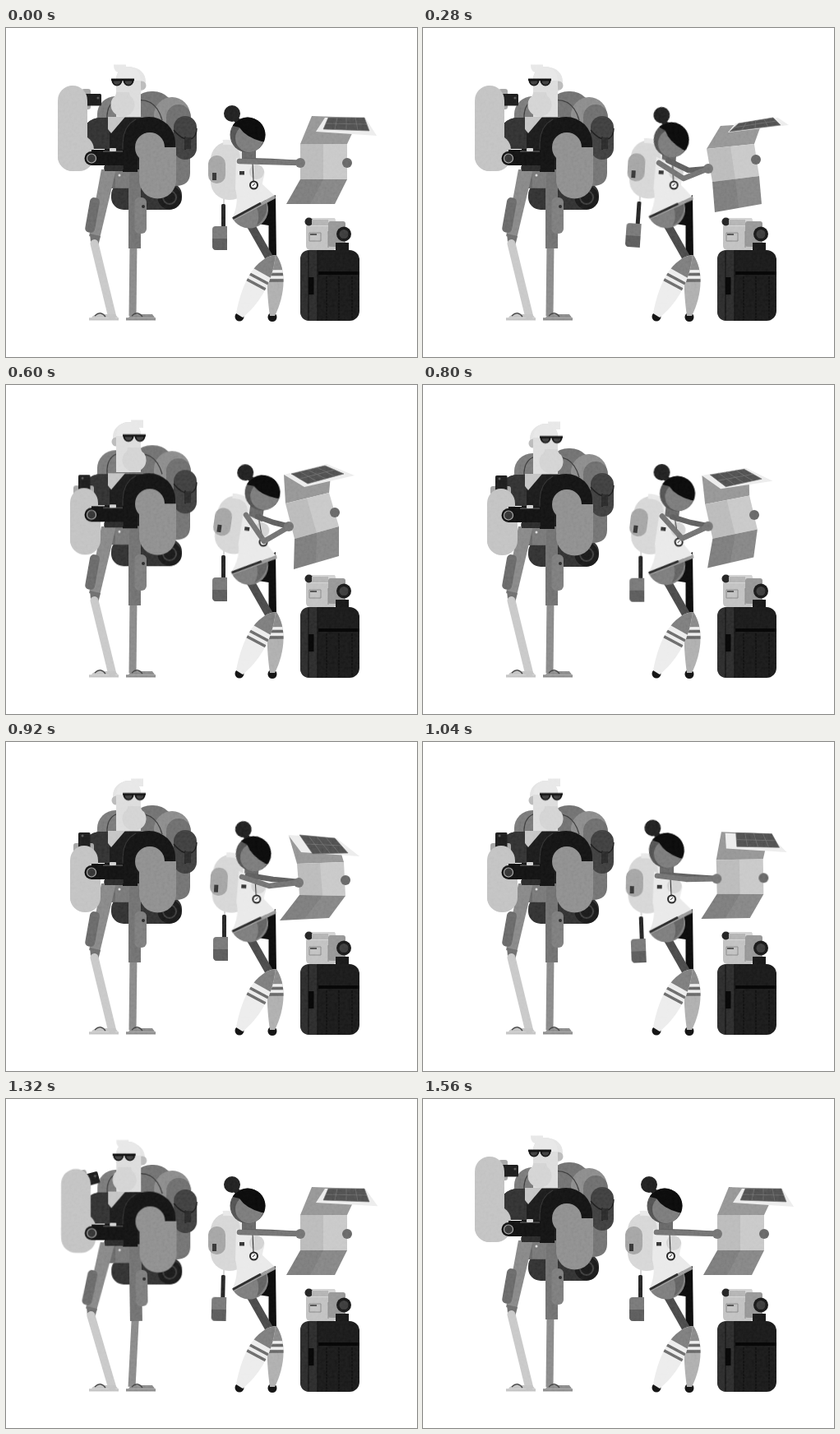
Write an HTML page without scripts that moves like this. It is 500 by 400 pixels and loops after 1.6 s.

```html
<!DOCTYPE html>
<html lang="en">
<head>
<meta charset="utf-8">
<title>Two travellers</title>
<style>
html, body { margin: 0; width: 100%; height: 100%; overflow: hidden; background: #fff; }
svg { display: block; width: 100vw; height: 100vh; }
.m { animation: 1.6s ease-in-out infinite; }
.w { animation: 1.6s cubic-bezier(.35, .2, .6, .85) infinite; }

/* man */
.body { animation-name: body; }
#pack { animation-name: pack; }
#armR { animation-name: armR; }
#head { animation-name: head; }
#skull { animation-name: skull; }
#specs { animation-name: specs; }
#quiff { animation-name: quiff; }
#beard { animation-name: beard; }
#earL { animation-name: earL; }
#earR { animation-name: earR; }
#foreArm { animation-name: foreArm; }
#upperArm { animation-name: upperArm; }
#phone { animation-name: phone; }
#thighL { animation-name: thighL; transform-origin: 124px 178px; }
#thighR { animation-name: thighR; transform-origin: 156px 190px; }
#shinL { animation-name: shinL; }
#shinR { animation-name: shinR; }
@keyframes body {
  0%, 17.5%, 45%, 67.5%, 95%, 100% { transform: none; }
  22.5%, 72.5% { transform: translate(0, 3px); }
  27.5%, 77.5% { transform: translate(.5px, 10px); }
  37.5%, 87.5% { transform: translate(0, -.7px); }
}
@keyframes pack {
  0%, 27.5%, 45%, 77.5%, 95%, 100% { transform: none; }
  37.5%, 87.5% { transform: translate(0, -3px); }
}
@keyframes armR {
  0%, 17.5%, 37.5%, 67.5%, 87.5%, 100% { transform: none; }
  27.5%, 77.5% { transform: translate(.5px, -2px); }
}
@keyframes head {
  0%, 17.5%, 45%, 67.5%, 95%, 100% { transform: none; }
  27.5%, 77.5% { transform: translate(0, 2px); }
  72.5% { transform: translate(0, 2px); }
  37.5%, 87.5% { transform: translate(0, -1.3px); }
}
@keyframes skull {
  0%, 17.5%, 87.5%, 100% { transform: none; }
  27.5%, 77.5% { transform: translate(-3px, 2px); }
  37.5%, 67.5% { transform: translate(-6px, 0); }
}
@keyframes specs {
  0%, 17.5%, 87.5%, 100% { transform: none; }
  27.5%, 77.5% { transform: translate(3px, 0); }
  37.5%, 67.5% { transform: translate(14px, .5px); }
  72.5% { transform: translate(11.5px, 0); }
}
@keyframes quiff {
  0%, 17.5%, 87.5%, 100% { transform: none; }
  27.5%, 77.5% { transform: translate(6px, 1px); }
  37.5%, 67.5% { transform: translate(21px, 0); }
  72.5% { transform: translate(17px, 0); }
}
@keyframes beard {
  0%, 17.5%, 87.5%, 100% { transform: none; }
  27.5%, 77.5% { transform: translate(4px, 0); }
  37.5%, 67.5% { transform: translate(14px, 0); }
  72.5% { transform: translate(11px, 0); }
}
@keyframes earL {
  0%, 17.5%, 87.5%, 100% { transform: translate(10px, 0); }
  27.5%, 77.5% { transform: translate(1px, 0); }
  37.5%, 67.5% { transform: none; }
  72.5% { transform: translate(-2px, 0); }
}
@keyframes earR {
  0%, 17.5%, 87.5%, 100% { transform: none; }
  27.5%, 77.5% { transform: translate(1px, 0); }
  37.5%, 72.5% { transform: translate(-10px, 0); }
}
@keyframes foreArm {
  0%, 17.5%, 87.5%, 100% { x: 63px; y: 70px; width: 36px; height: 104px; }
  27.5% { x: 75px; y: 125px; width: 35px; height: 74px; }
  37.5%, 67.5% { x: 78px; y: 126px; width: 34px; height: 80px; }
  73.5% { x: 76px; y: 127px; width: 35px; height: 79px; }
  80% { x: 68px; y: 84px; width: 36px; height: 96px; }
}
@keyframes upperArm {
  0%, 17.5%, 87.5%, 100% { x: 63px; y: 130px; width: 44px; height: 44px; }
  27.5% { x: 75px; y: 142px; width: 37px; height: 59px; }
  37.5%, 67.5%, 73.5% { x: 78px; y: 146px; width: 37px; height: 61px; }
}
@keyframes phone {
  0%, 17.5%, 87.5%, 100% { transform: translate(104px, 87px); }
  27.5% { transform: translate(95px, 118px) rotate(-90deg); }
  37.5%, 73.5% { transform: translate(95px, 122px) rotate(-90deg); }
  80% { transform: translate(100px, 95px) rotate(-20deg); }
}
@keyframes thighL {
  0%, 17.5%, 37.5%, 67.5%, 87.5%, 100% { transform: none; }
  22.5%, 72.5% { transform: translate(-1px, 2px) rotate(1.5deg); }
  27.5%, 77.5% { transform: translate(-3px, 5px) rotate(4deg); }
}
@keyframes thighR {
  0%, 17.5%, 37.5%, 67.5%, 87.5%, 100% { transform: none; }
  22.5%, 72.5% { transform: translate(1px, 1.5px) rotate(-.5deg); }
  27.5%, 77.5% { transform: translate(1.5px, 4px) rotate(-1.8deg); }
}
@keyframes shinL {
  0%, 17.5%, 37.5%, 67.5%, 87.5%, 100% { d: path("M107.500 262L129 350"); }
  22.5%, 72.5% { d: path("M105 262L129 350"); }
  27.5%, 77.5% { d: path("M99 264L129 350"); }
}
@keyframes shinR {
  0%, 17.5%, 37.5%, 67.5%, 87.5%, 100% { d: path("M155 262L154 350"); }
  27.5%, 77.5% { d: path("M160 264L152 350"); }
}

/* woman */
.torso { animation-name: torso; transform-origin: 300px 220px; }
#pendant { animation-name: pendant; transform-origin: 300px 164px; }
#face { animation-name: face; transform-origin: 294px 130px; }
#bag { animation-name: bag; transform-origin: 265px 208px; }
#farArm { animation-name: farArm; }
#nearArm { animation-name: nearArm; }
#handL { animation-name: handL; }
#handR { animation-name: handR; }
#mapTop { animation-name: mapTop; }
#mapMid { animation-name: mapMid; }
#mapLow { animation-name: mapLow; }
#mapShade { animation-name: mapShade; }
#flap { animation-name: flap; }
#grid { animation-name: grid; }
@keyframes torso {
  0%, 10%, 70%, 100% { transform: none; }
  17.5% { transform: rotate(3.5deg); }
  27.5%, 47.5% { transform: rotate(8deg); }
  57.5% { transform: rotate(3deg); }
}
@keyframes pendant {
  0%, 10%, 70%, 100% { transform: none; }
  17.5%, 57.5% { transform: rotate(-4deg); }
  27.5%, 47.5% { transform: rotate(-16deg); }
}
@keyframes face {
  0%, 10%, 70%, 100% { transform: none; }
  17.5% { transform: translate(8px, 6px) rotate(15deg); }
  27.5%, 47.5% { transform: translate(18px, 1px) rotate(-4deg); }
  57.5% { transform: translate(7px, 6px) rotate(14deg); }
}
@keyframes bag {
  0%, 10%, 90%, 100% { transform: none; }
  17.5% { transform: translate(-1px, -3px) rotate(4deg); }
  27.5% { transform: translate(2px, -6px) rotate(-7deg); }
  37.5%, 47.5% { transform: translate(0, -7px); }
  57.5% { transform: translate(1px, -4px); }
  72.5% { transform: rotate(-4deg); }
  81% { transform: rotate(1.5deg); }
}
@keyframes farArm {
  0%, 10%, 70%, 100% { d: path("M290 161L322 162L358 164"); }
  17.5% { d: path("M298 161L323 173L347 171"); }
  27.5%, 47.5% { d: path("M306 160L325 167L345 172"); }
  57.5% { d: path("M294 162L325 167L356 170"); }
}
@keyframes nearArm {
  0%, 10%, 70%, 100% { d: path("M284 162L320 163L358 164"); }
  17.5% { d: path("M287 164L317 183L347 171"); }
  27.5%, 47.5% { d: path("M292 158L314 190L345 172"); }
  57.5% { d: path("M287 164L320 175L356 171"); }
}
@keyframes handL {
  0%, 10%, 70%, 100% { transform: none; }
  17.5% { transform: translate(-11px, 7px); }
  27.5%, 47.5% { transform: translate(-14px, 8px); }
  57.5% { transform: translate(-2px, 7px); }
}
@keyframes handR {
  0%, 10%, 70%, 100% { transform: none; }
  17.5% { transform: translate(-10px, -4px); }
  27.5%, 47.5% { transform: translate(-15px, -9px); }
  57.5% { transform: translate(-2px, 4px); }
}
@keyframes mapTop {
  0%, 10%, 70%, 100% { d: path("M372 107L430 109L415 141L358 141Z"); }
  17.5% { d: path("M362 119L412 116L403 141L345 147Z"); }
  27.5%, 47.5% { d: path("M338 109L395 110L393 131L340 144Z"); }
  57.5% { d: path("M344 114L402 117L411 146L354 148Z"); }
}
@keyframes mapMid {
  0%, 10%, 70%, 100% { d: path("M358 141L415 141L415 184L358 184Z"); }
  17.5% { d: path("M345 147L403 141L409 180L352 187Z"); }
  27.5%, 47.5% { d: path("M340 144L393 131L405 172L351 187Z"); }
  57.5% { d: path("M354 148L411 146L413 187L357 186Z"); }
}
@keyframes mapLow {
  0%, 10%, 70%, 100% { d: path("M358 184L415 184L400 214L341 214Z"); }
  17.5% { d: path("M352 187L409 180L412 214L355 224Z"); }
  27.5%, 47.5% { d: path("M351 187L405 172L405 208L350 224Z"); }
  57.5% { d: path("M357 186L413 187L393 214L333 217Z"); }
}
@keyframes mapShade {
  0%, 10%, 70%, 100% { d: path("M358 141L386 141L386 184L370 214L341 214L358 184Z"); }
  17.5% { d: path("M345 147L374 144L380 184L384 219L355 224L352 187Z"); }
  27.5%, 47.5% { d: path("M340 144L366 138L378 180L377 216L350 224L351 187Z"); }
  57.5% { d: path("M354 148L382 147L385 187L363 215L333 217L357 186Z"); }
}
@keyframes flap {
  0%, 10%, 100% { d: path("M388 109L437 109L451 131L377 126Z"); }
  17.5% { d: path("M380 116L432 109L445 118L371 127Z"); }
  27.5%, 47.5% { d: path("M338 109L390 96L424 110L363 124Z"); }
  57.5% { d: path("M343 113L402 117L430 139L359 134Z"); }
  72.5% { d: path("M388 109L438 110L453 130L377 126Z"); }
}
@keyframes grid {
  0%, 10%, 70%, 100% { d: path("M392 109L436 109L442 125L386 123ZM389 116L439 117M403 109L400 123M414 109L414 124M425 109L428 124"); }
  17.5% { d: path("M384 116L426 109L435 118L373 126ZM378 121L430 113M394 114L388 124M405 112L404 122M415 111L420 120"); }
  27.5%, 47.5% { d: path("M347 108L388 98L411 108L367 120ZM357 114L400 103M357 105L378 117M367 103L389 114M378 100L400 111"); }
  57.5% { d: path("M357 113L400 117L416 135L373 136ZM365 124L408 126M368 114L384 136M378 115L394 135M389 116L405 135"); }
}
</style>
</head>
<body>
<svg viewBox="0 0 500 400">
  <defs>
    <filter id="grain" x="0" y="0" width="100%" height="100%">
      <feTurbulence type="fractalNoise" baseFrequency=".3" numOctaves="2" seed="4"/>
      <feColorMatrix values="1 0 0 0 0  1 0 0 0 0  1 0 0 0 0  0 0 0 0 1"/>
    </filter>
    <g id="sandal">
      <path d="M104 352Q108 347 117 348H133L136 352Z"/>
      <path d="M101 352.300H137V355.500H101Z"/>
      <path d="M108 350Q115 343 121 351" fill="none" stroke="#444" stroke-width="1.300"/>
    </g>
    <path id="calf" d="M328 276C304 279 287 308 280 347L288 352C307 336 324 312 328 276Z"/>
    <path id="calf2" d="M320 278C316 300 318 330 321 350H327C338 328 343 298 329 276Z"/>
    <clipPath id="calfClip"><use href="#calf"/></clipPath>
    <clipPath id="calfClip2"><use href="#calf2"/></clipPath>
    <clipPath id="faceClip"><circle cx="294" cy="130" r="21.500"/></clipPath>
  </defs>
  <rect width="500" height="400" fill="#fff"/>

  <g id="man">
    <g class="m body">
      <rect x="128" y="188" width="86" height="33" rx="15" fill="#303030"/>
      <circle cx="199" cy="206" r="14.500" fill="#191919"/>
      <circle cx="199" cy="206" r="8" fill="none" stroke="#3c3c3c" stroke-width="2"/>
      <g id="pack" class="m">
        <rect x="111" y="83" width="50" height="60" rx="22" fill="#797979"/>
        <path d="M123 125V106Q124 91 136 87" fill="none" stroke="#3a3a3a" stroke-width="1.300"/>
        <rect x="150" y="77" width="56" height="110" rx="27" fill="#707070"/>
        <rect x="180" y="84" width="44" height="108" rx="22" fill="#8b8b8b"/>
        <rect x="195" y="93" width="30" height="65" rx="15" fill="#6d6d6d"/>
        <path d="M196 135H224V176Q224 192 206 192H196Z" fill="#727272"/>
        <path d="M150 90Q181 80 190 112" fill="none" stroke="#3a3a3a" stroke-width="1.300"/>
        <rect x="204" y="107" width="28" height="53" rx="14" fill="#3d3d3d"/>
        <path d="M204 124Q216 139 227 134Q232 130 232 122M218 132V148" fill="none" stroke="#1c1c1c" stroke-width="1.400"/>
        <rect x="218" y="133" width="7" height="14" fill="#292929"/>
      </g>
      <path d="M119 168H163V195H119Z" fill="#686868"/>
    </g>

    <g id="thighL" class="m">
      <path d="M116 172H134L114 256L101 253Z" fill="#878787"/>
      <path d="M102 250L115 253L112 265L103 260Z" fill="#6d6d6d"/>
      <rect x="99" y="206" width="12" height="43" rx="5" fill="#686868" transform="rotate(10 105 228)"/>
    </g>
    <path id="shinL" class="m" d="M107.500 262L129 350" stroke="#c8c8c8" stroke-width="10" stroke-linecap="round"/>
    <path id="shinR" class="m" d="M155 262L154 350" stroke="#898989" stroke-width="9"/>
    <g id="thighR" class="m">
      <path d="M149 172H164V268H149Z" fill="#707070"/>
      <rect x="156.500" y="206" width="14.500" height="44" rx="6" fill="#7c7c7c"/>
      <circle cx="167" cy="217" r="2" fill="#2a2a2a"/>
    </g>
    <use href="#sandal" fill="#c3c3c3"/>
    <use href="#sandal" x="45" fill="#8b8b8b"/>

    <g class="m body">
      <path d="M133 172H150V194H133Z" fill="#777"/>
      <path d="M92 147V132A23 23 0 0 1 115 109H170V172H120V147Z" fill="#1a1a1a"/>
      <path d="M92 147V132A23 23 0 0 1 115 109H126V147Z" fill="#303030"/>
      <path d="M142 175V140A32 32 0 0 1 174 108A32 32 0 0 1 206 140V146H160V175Z" fill="#131313"/>
      <path d="M142 172V140Q143 118 158 111" fill="none" stroke="#333" stroke-width="1"/>
      <path d="M124 108H145L128 128L124 123Z" fill="#c4c4c4"/>
      <path id="armR" class="m" d="M157 145A18 18 0 0 1 193 145H207V185A22.500 22.500 0 0 1 162 185V158Q157 153 157 145Z" fill="#8e8e8e"/>

      <g id="head" class="m">
        <circle id="skull" class="m" cx="153" cy="65" r="17" fill="#e4e4e4"/>
        <circle id="earL" class="m" cx="134" cy="71" r="5.500" fill="#bababa"/>
        <circle id="earR" class="m" cx="165" cy="70" r="5.500" fill="#bababa"/>
        <path d="M134 108V62A14.500 14.500 0 0 1 164 62V108Z" fill="#dcdcdc"/>
        <path d="M134 64V62A14.500 14.500 0 0 1 164 62V64Z" fill="#e7e7e7"/>
        <path id="quiff" class="m" d="M131 44.500H146V54H138Q131 54 131 44.500Z" fill="#e7e7e7"/>
        <path id="beard" class="m" d="M134 78H150Q150 83 154 85A14.500 14.500 0 1 1 130 85Q134 83 134 78Z" fill="#d3d3d3"/>
        <g id="specs" class="m" fill="#111">
          <path d="M128 61.500H156V64H128Z"/>
          <path d="M128.500 62H141.500V64A6.500 6.500 0 0 1 128.500 64ZM142.500 62H155.500V64A6.500 6.500 0 0 1 142.500 64Z"/>
          <path d="M130.500 64.500H139.500A4.500 4.500 0 0 1 130.500 64.500ZM144.500 64.500H153.500A4.500 4.500 0 0 1 144.500 64.500Z" fill="#3d3d3d"/>
        </g>
      </g>

      <g id="phone" class="m">
        <rect x="-12" y="-13" width="11" height="25" rx="3" fill="#a5a5a5"/>
        <rect x="-14" y="-7" width="26" height="14.500" rx="1.500" fill="#1c1c1c"/>
        <circle cx="8" cy="-2" r="1.500" fill="#555"/>
      </g>
      <g fill="#c2c2c2">
        <rect id="upperArm" class="m" x="63" y="130" width="44" height="44" rx="18"/>
        <rect id="foreArm" class="m" x="63" y="70" width="36" height="104" rx="18"/>
      </g>

      <rect x="104" y="148" width="40" height="19" fill="#121212"/>
      <path d="M118 149H142V151H118Z" fill="#3a3a3a"/>
      <rect x="126" y="146" width="8" height="4" rx="1" fill="#d0d0d0"/>
      <circle cx="104" cy="158.500" r="8.500" fill="#121212"/>
      <circle cx="104" cy="158.500" r="5.500" fill="#333" stroke="#a5a5a5" stroke-width="1.200"/>
      <path d="M120 167H142V174H120Z" fill="#292929"/>
      <circle cx="138" cy="179" r="1.500" fill="#ddd"/>
    </g>
  </g>

  <g id="woman">
    <g id="bag" class="w">
      <path d="M265 190V216" stroke="#aaa"/>
      <rect x="262" y="214" width="5" height="28" rx="1.500" fill="#242424"/>
      <path d="M255 241H269V270H256Q251 270 251 265V245Q251 241 255 241Z" fill="#777"/>
      <path d="M251 256H269V270H256Q251 270 251 265Z" fill="#5a5a5a"/>
    </g>
    <path d="M328 203L329 278H319.500V240L306 238V215Z" fill="#0c0c0c"/>
    <path d="M291 228L320 279" stroke="#484848" stroke-width="10"/>
    <circle cx="284" cy="351" r="5.500" fill="#111"/>
    <circle cx="324" cy="351.500" r="5.500" fill="#111"/>
    <use href="#calf2" fill="#aeaeae"/>
    <g clip-path="url(#calfClip2)" stroke-width="3.500">
      <path d="M314 284H344" stroke="#888" stroke-width="20"/>
      <path d="M314 296H344M314 303H344" stroke="#eee"/>
      <path d="M314 299.500H344M314 307H344" stroke="#666"/>
    </g>
    <use href="#calf" fill="#ececec"/>
    <g clip-path="url(#calfClip)" stroke-width="3.500">
      <path d="M301 276L335 295" stroke="#7c7c7c" stroke-width="28"/>
      <path d="M292 294L322 310" stroke="#eee"/>
      <path d="M292 296.500L322 312.500M288 303L318 319" stroke="#6b6b6b"/>
    </g>

    <g class="w torso">
      <rect x="249" y="138" width="46" height="71" rx="22" fill="#d6d6d6"/>
      <path d="M264 139Q290 136 288 165V205" fill="none" stroke="#e8e8e8" stroke-width="6"/>
      <rect x="246" y="155" width="21" height="34" rx="10" fill="#a4a4a4"/>
      <rect x="251" y="176" width="5" height="9" fill="#353535"/>
      <path d="M287 140H304V166H287Z" fill="#666"/>
      <path d="M280 158L300 164Q317 168 314 180Q312 187 312 190L327 204L275 232Q284 212 279 196Z" fill="#e9e9e9"/>
      <circle cx="305" cy="175" r="9" fill="#d2d2d2"/>
      <rect x="284" y="174" width="6" height="4.500" fill="#333"/>
      <g id="pendant" class="w" stroke="#222">
        <path d="M300 164L301 186"/>
        <circle cx="301.500" cy="191" r="4.500" fill="#f4f4f4" stroke-width="2"/>
        <path d="M300 192L303 189"/>
      </g>
      <path d="M276 232L316 209A23 23 0 0 1 276 232Z" fill="#7c7c7c"/>
      <path d="M304 216L316 209Q321 228 305 240Q310 229 304 216Z" fill="#606060"/>
      <path d="M275 231L327 203L328 207L277 234Z" fill="#9a9a9a"/>
      <path d="M276 231.500L310 213" stroke="#292929" stroke-width="3"/>
    </g>

    <g id="map">
      <path id="mapTop" class="w" d="M372 107L430 109L415 141L358 141Z" fill="#959595"/>
      <path id="mapMid" class="w" d="M358 141H415V184H358Z" fill="#c8c8c8"/>
      <path id="mapLow" class="w" d="M358 184H415L400 214H341Z" fill="#858585"/>
      <path id="mapShade" class="w" d="M358 141H386V184L370 214H341L358 184Z" opacity=".07"/>
      <path id="flap" class="w" d="M388 109H437L451 131L377 126Z" fill="#ececec"/>
      <path id="grid" class="w" d="M392 109H436L442 125L386 123Z" fill="#4e4e4e" stroke="#737373" stroke-width=".7"/>
    </g>
    <g fill="none" stroke-width="6.500" stroke-linejoin="round" stroke-linecap="round">
      <path id="farArm" class="w" d="M290 161L322 162L358 164" stroke="#5d5d5d"/>
      <path id="nearArm" class="w" d="M284 162L320 163L358 164" stroke="#727272"/>
    </g>
    <circle id="handL" class="w" cx="358" cy="164" r="6" fill="#727272"/>
    <circle id="handR" class="w" cx="415" cy="164" r="6" fill="#666"/>

    <g id="face" class="w">
      <path d="M279 110L286 117" stroke="#1d1d1d" stroke-width="7"/>
      <circle cx="275" cy="104" r="10" fill="#1f1f1f"/>
      <g clip-path="url(#faceClip)">
        <circle cx="294" cy="130" r="22" fill="#515151"/>
        <circle cx="296" cy="134" r="17" fill="#7a7a7a"/>
        <path d="M276 105H320V138H311Q292 133 284 121L276 119Z" fill="#0b0b0b"/>
      </g>
    </g>
  </g>

  <g id="luggage">
    <rect x="358" y="270" width="72" height="86" rx="12" fill="#191919"/>
    <path d="M379 270H370Q358 270 358 282V344Q358 356 370 356H379Z" fill="#2a2a2a"/>
    <path d="M368 271V355M379 270V356" stroke="#131313" stroke-width="1.200"/>
    <rect x="368" y="303" width="6.500" height="21" fill="#070707"/>
    <path d="M380 298H430" stroke="#060606" stroke-width="4"/>
    <path d="M390 302V355M405 302V355M421 302V355" stroke="#0a0a0a" stroke-dasharray="3 1"/>

    <rect x="365" y="237" width="38" height="33" rx="5" fill="#c1c1c1"/>
    <path d="M368 231H400Q403 236 398 241H368Z" fill="#d3d3d3"/>
    <circle cx="368.500" cy="235.500" r="5" fill="#222"/>
    <path d="M372 233H392V240H372Z" fill="#b3b3b3"/>
    <rect x="392" y="235" width="21" height="31" rx="3" fill="#969696"/>
    <path d="M369 249H383V259H369ZM392 247V267" fill="none" stroke="#888"/>
    <path d="M370 251H378" stroke="#555" stroke-width="2"/>
    <rect x="401" y="261" width="16" height="9" fill="#171717"/>
    <circle cx="411" cy="250.500" r="9" fill="#181818"/>
    <circle cx="411" cy="250.500" r="5.500" fill="#3a3a3a"/>
  </g>

  <rect width="500" height="400" filter="url(#grain)" opacity=".2" style="mix-blend-mode:soft-light"/>
</svg>
</body>
</html>
```
